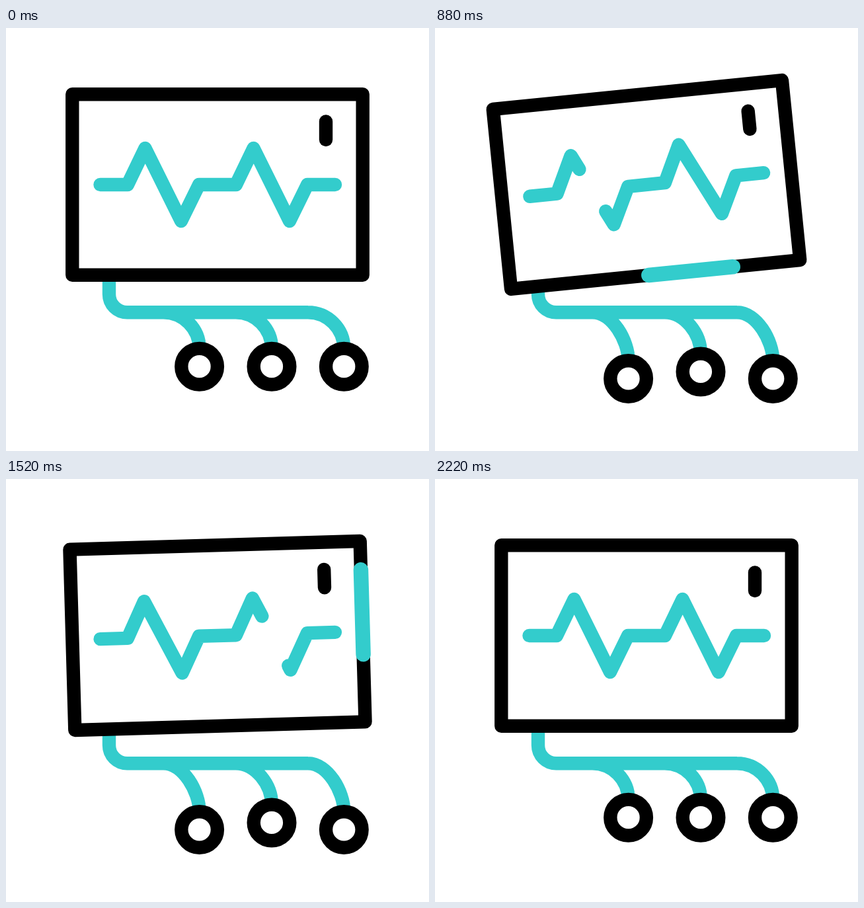
Write an HTML page with a canvas that moves like this. It is 640 px wide and 640 px high and loops after 2.4 s.

```html
<!DOCTYPE html>
<html lang="en">
<head>
<meta charset="utf-8">
<title>Heart monitor</title>
<style>
html, body { margin: 0; width: 100%; height: 100%; overflow: hidden; background: #fff; }
canvas { display: block; width: 640px; height: 640px; }
</style>
</head>
<body>
<canvas id="stage"></canvas>
<script>
const LOOP = 2400, STEP = 20;
const TEAL = '#33cccc', INK = '#000', LINE = 20.4;
const canvas = document.getElementById('stage');
const ctx = canvas.getContext('2d');
const dpr = window.devicePixelRatio || 1;
canvas.width = canvas.height = Math.round(640 * dpr);

// Monitor shapes are relative to the centre of the screen.
const CX = 320, CY = 237, W = 219.7, H = 136.7;
const wave = [[-177.5, 0], [-136, 0], [-109.5, -55], [-55, 55], [-28, 0],
  [28, 0], [54.5, -55], [109, 55], [136, 0], [178, 0]];
const border = [[W, H], [-W, H], [-W, -H], [W, -H], [W, H]];

const pathLength = pts => pts.slice(1).reduce(
  (sum, p, i) => sum + Math.hypot(p[0] - pts[i][0], p[1] - pts[i][1]), 0);
const WAVE_LEN = pathLength(wave), BORDER_LEN = pathLength(border);

const tiltKeys = [[200, 0], [833, -6.4], [1167, 6], [1600, -2.4], [2000, 2], [2210, 0]];
const outerKeys = [[200, 0], [700, 26], [1200, 0], [1700, 26], [2200, 0]];
const middleKeys = [[700, 0], [1200, 26], [1700, 0]];
const tailKeys = [[200, 0], [400, 12], [640, 44], [1080, 209.5], [1360, 353],
  [1720, 521.6], [2200, WAVE_LEN]];

function ease(t, from, to) {
  const u = Math.min(1, Math.max(0, (t - from) / (to - from)));
  return u * u * (3 - 2 * u);
}

// Eases to a stop at every key.
function swing(keys, t) {
  let v = keys[0][1];
  for (let i = 1; i < keys.length; i++) {
    v += (keys[i][1] - keys[i - 1][1]) * ease(t, keys[i - 1][0], keys[i][0]);
  }
  return v;
}

// Smooth curve through the keys, at rest only at both ends.
function glide(keys, t) {
  const last = keys.length - 1;
  if (t <= keys[0][0]) return keys[0][1];
  if (t >= keys[last][0]) return keys[last][1];
  const i = keys.findIndex(k => k[0] > t) - 1;
  const slope = n => n === 0 || n === last ? 0 :
    (keys[n + 1][1] - keys[n - 1][1]) / (keys[n + 1][0] - keys[n - 1][0]);
  const [t0, a] = keys[i], [t1, b] = keys[i + 1];
  const d = t1 - t0, u = (t - t0) / d, h = u * u * (3 - 2 * u);
  return a + (b - a) * h + d * u * (1 - u) * (slope(i) * (1 - u) - slope(i + 1) * u);
}

function trace(pts) {
  ctx.beginPath();
  pts.forEach(p => ctx.lineTo(p[0], p[1]));
}

function stroke(color, width = LINE) {
  ctx.strokeStyle = color;
  ctx.lineWidth = width;
  ctx.stroke();
}

function strokePart(pts, from, to, width) {
  if (to - from < 0.01) return;
  ctx.setLineDash([to - from, 9999]);
  ctx.lineDashOffset = -from;
  trace(pts);
  stroke(TEAL, width);
  ctx.setLineDash([]);
}

function cables(drops) {
  ctx.lineCap = 'butt';
  ctx.beginPath();
  ctx.moveTo(156, 362);
  ctx.lineTo(156, 403);
  ctx.arcTo(156, 430.2, 183, 430.2, 27.2);
  ctx.lineTo(457, 430.2);
  drops.forEach(([x, dy]) => {
    const end = 484.8 + dy;
    ctx.moveTo(x - 54.6, 430.2);
    ctx.bezierCurveTo(x - 24.5, 430.2, x, end - 30.1, x, end);
  });
  stroke(TEAL);
  ctx.lineCap = 'round';
}

function ball([x, dy]) {
  ctx.beginPath();
  ctx.arc(x, 512.2 + dy, 27.3, 0, Math.PI * 2);
  ctx.fillStyle = '#fff';
  ctx.fill();
  stroke(INK);
}

function monitor(t) {
  ctx.save();
  ctx.translate(CX, CY);
  ctx.rotate(swing(tiltKeys, t) * Math.PI / 180);

  ctx.beginPath();
  ctx.rect(-W, -H, 2 * W, 2 * H);
  ctx.fillStyle = '#fff';
  ctx.fill();
  stroke(INK);
  trace([[164, -95.5], [164, -68]]);
  stroke(INK);

  if (t <= 200 || t >= 2200) {
    trace(wave);
    stroke(TEAL);
  } else {
    strokePart(wave, 0, glide(tailKeys, t));
    strokePart(wave, WAVE_LEN * ease(t, 200, 2000), WAVE_LEN);
  }
  strokePart(border, BORDER_LEN * ease(t, 700, 1800), BORDER_LEN * ease(t, 600, 1700), 22.5);
  ctx.restore();
}

function draw(t) {
  ctx.setTransform(dpr, 0, 0, dpr, 0, 0);
  ctx.fillStyle = '#fff';
  ctx.fillRect(0, 0, 640, 640);
  ctx.lineCap = ctx.lineJoin = 'round';
  const outer = swing(outerKeys, t), middle = swing(middleKeys, t);
  const drops = [[292.6, outer], [402, middle], [511.3, outer]];
  cables(drops);
  monitor(t);
  drops.forEach(ball);
}

const start = performance.now();
function frame() {
  const t = (performance.now() - start) % LOOP;
  draw(Math.floor(t / STEP) * STEP);
  requestAnimationFrame(frame);
}
frame();
</script>
</body>
</html>
```
